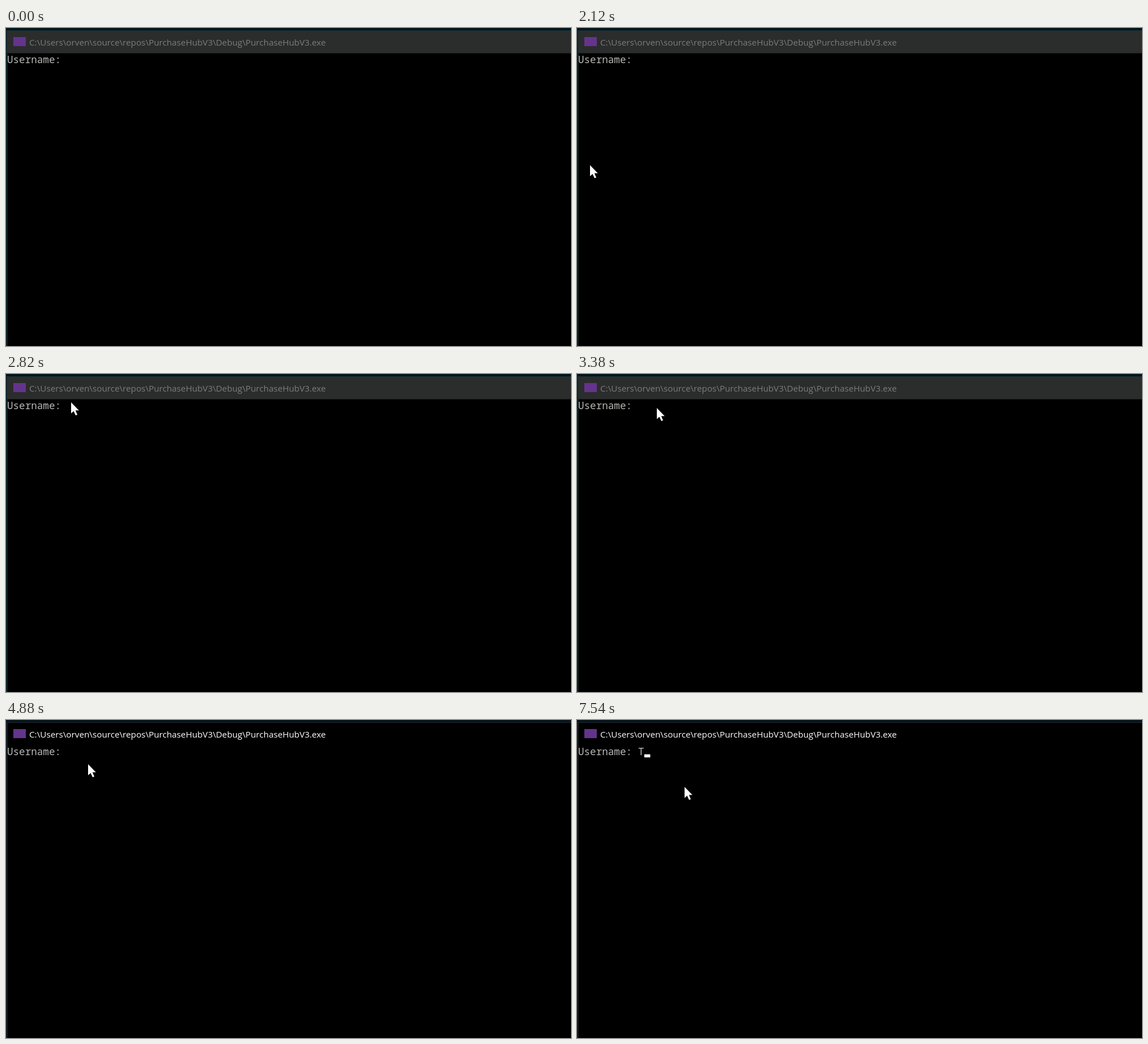
An HTML page for the animation above (8 s loop, 998 by 561 pixels).

```html
<!DOCTYPE html>
<html lang="en">
<head>
<meta charset="utf-8">
<style>
  html, body { margin: 0; width: 100%; height: 100%; overflow: hidden; background: #000; }
  svg { display: block; width: 100vw; height: 100vh; }
  #title { font: 15.25px "Open Sans", "Noto Sans", sans-serif; }
  .console { font: 17.6px "Noto Sans Mono", "DejaVu Sans Mono", monospace; fill: #b8b9b5; }
</style>
</head>
<body>
<svg viewBox="0 0 998 561">
  <rect width="998" height="561" fill="#06141b"/>
  <rect id="frame" x="1" y="4" width="997" height="557"/>
  <rect x="2.5" y="44" width="996" height="517"/>
  <rect id="bar" x="2.5" y="5" width="996" height="39.5"/>
  <rect x="13" y="16" width="22" height="16" fill="#64348c"/>
  <text id="title" x="41" y="30.5">C:\Users\orven\source\repos\PurchaseHubV3\Debug\PurchaseHubV3.exe</text>
  <text class="console" x="2" y="62">Username:</text>
  <text class="console" id="typed" x="108" y="62">T</text>
  <rect id="caret" y="60.5" width="10.6" height="5.5" fill="#f4f4f4"/>
  <path id="pointer" d="M0 0V19.5L4.5 15.5L8 23L11 21.7L7.8 14.3H13.8Z" fill="#fff"/>
</svg>
<script>
const LOOP = 8000, ENTER = 1800, FOCUS = 3620, CARET_ON = 5160, CARET_OFF = 6580, TYPE = 7540;

const el = id => document.getElementById(id);
const show = (id, on) => el(id).setAttribute("visibility", on ? "visible" : "hidden");
const fill = (id, color) => el(id).setAttribute("fill", color);

// Eased move from a to b; the power sets how late it speeds up.
function glide(t, start, end, a, b, power) {
  const k = Math.min(1, Math.max(0, (t - start) / (end - start)));
  return a + (b - a) * k ** power;
}

// The pointer sweeps in, settles beside the prompt, then drifts down.
function pointerAt(t) {
  if (t < 2640) return [glide(t, ENTER, 2540, 1, 82, 1.55), glide(t, ENTER, 2540, 416, 47, 0.9)];
  if (t < FOCUS) return [glide(t, 2640, 3380, 82, 141, 0.41), glide(t, 2640, 3380, 47, 60, 1)];
  return [glide(t, 4360, 5200, 141, 190, 5.2), glide(t, 4360, 5200, 60, 118, 2.4)];
}

function draw() {
  const t = performance.now() % LOOP;
  const active = t >= FOCUS, typed = t >= TYPE;
  fill("frame", active ? "#20292d" : "#123036");
  fill("bar", active ? "#000" : "#2b2c2c");
  fill("title", active ? "#fff" : "#7c7c7c");
  show("typed", typed);
  show("caret", typed || t >= CARET_ON && t < CARET_OFF);
  el("caret").setAttribute("x", typed ? 118.8 : 108.2);
  show("pointer", t >= ENTER);
  el("pointer").setAttribute("transform", `translate(${pointerAt(t).map(Math.round)})`);
  requestAnimationFrame(draw);
}
draw();
</script>
</body>
</html>
```
